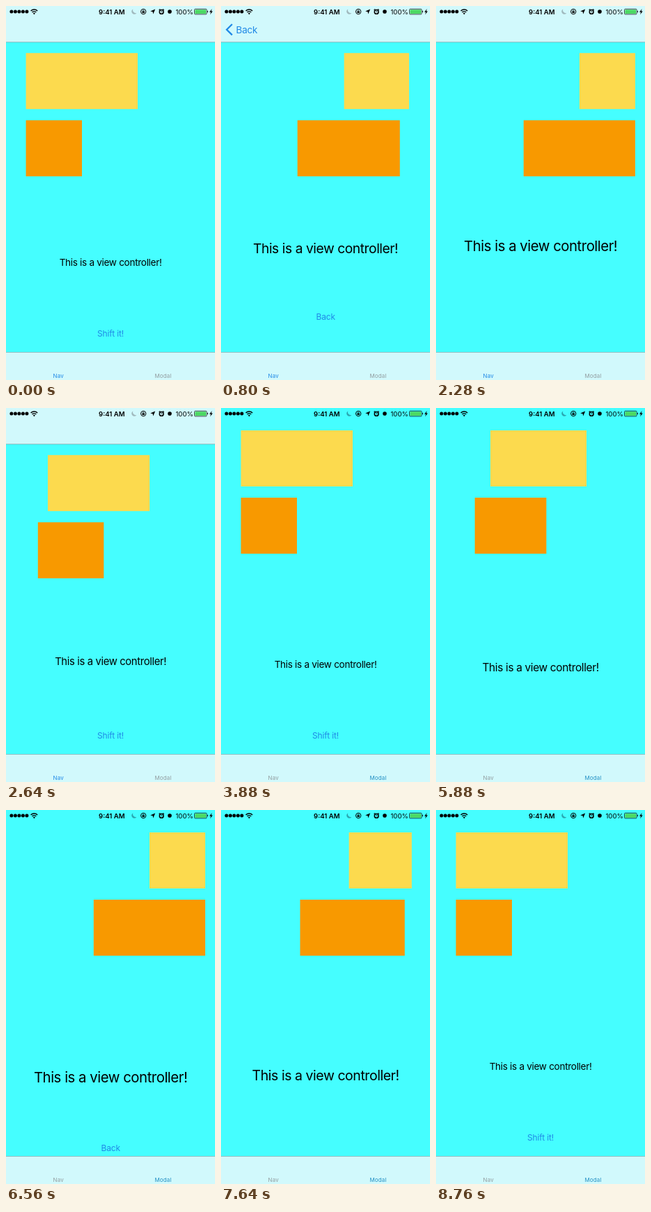
Write an HTML page that moves like this. It is 300 px wide and 534 px high and loops after 8800 ms.

```html
<!DOCTYPE html>
<html lang="en">
<head>
<meta charset="utf-8">
<title>View transition</title>
<style>
  html, body { margin: 0; width: 100%; height: 100%; overflow: hidden; background: #45feff; }
  svg { display: block; width: 100%; height: 100%; }
  text { font-family: Inter, Roboto, "Liberation Sans", sans-serif; }
  .mid { text-anchor: middle; }
  .title { font-size: 13.6px; letter-spacing: -.024em; }
  .button { font-size: 12px; letter-spacing: -.01em; fill: #2089e6; }
  .tab { font-size: 8px; letter-spacing: .015em; }
  .status { font-size: 9.6px; }
  .line { fill: none; stroke: #000; }
  .bar { fill: #d1f9fc; }
  .edge { fill: #94bec2; }
</style>
</head>
<body>
<svg viewBox="0 0 300 534">
  <rect width="300" height="534" fill="#45feff"/>
  <rect id="yellow" height="80" fill="#fcda4e"/>
  <rect id="orange" height="80" fill="#f89900"/>
  <g id="label"><text class="title mid" y="5.1">This is a view controller!</text></g>
  <text id="shift" class="button mid" x="150" y="471.6">Shift it!</text>
  <text id="back" class="button mid" x="150.2">Back</text>

  <g id="navBar">
    <rect class="bar" width="300" height="51"/>
    <rect class="edge" y="51" width="300" height="1"/>
    <g id="navBack">
      <path d="M16 26 8.2 33.7 16 41.4" fill="none" stroke="#2089e6" stroke-width="2.3"/>
      <text class="title" x="21.6" y="38.7" fill="#2089e6">Back</text>
    </g>
  </g>

  <rect class="bar" y="494" width="300" height="40"/>
  <rect class="edge" y="494" width="300" height="1"/>
  <text id="navTab" class="tab mid" x="75.2" y="531.2">Nav</text>
  <text id="modalTab" class="tab mid" x="225.5" y="531.2">Modal</text>

  <g id="dots"></g>
  <g class="line" stroke-width="1.4">
    <path d="M35.6 7a6.8 6.8 0 0 1 9.6 0M37.5 9.1a4.1 4.1 0 0 1 5.8 0"/>
    <path d="M40.4 12.2 38.9 10.6a2.1 2.1 0 0 1 3 0Z" fill="#000" stroke="none"/>
  </g>
  <text class="status mid" x="151.8" y="11.6" font-weight="600">9:41 AM</text>
  <path id="moon" d="M182.2 4.4a4 4 0 1 0 5.4 5.6 4.4 4.4 0 0 1-5.4-5.6Z"/>
  <circle class="line" cx="197.2" cy="8" r="3.7"/>
  <rect x="195.5" y="7.4" width="3.4" height="2.6"/>
  <path class="line" d="M196.2 7.5v-.6a1 1 0 0 1 2 0v.6" stroke-width=".7"/>
  <path d="M214.2 4.5 211.3 11.6 210.6 8.2 207.2 7.5Z"/>
  <circle class="line" cx="223.2" cy="8.4" r="2.9" stroke-width="1.5"/>
  <path class="line" d="M219.6 5.8 221.3 4.3M226.8 5.8 225.1 4.3" stroke-width="1.1"/>
  <path class="line" d="M223.2 6.6v2h1.4" stroke-width=".7"/>
  <circle cx="235" cy="8" r="2.8"/>
  <text class="status mid" x="256.2" y="11.6">100%</text>
  <rect class="line" x="270.5" y="4.3" width="17.6" height="7.6" rx="1.2" stroke-width=".7"/>
  <rect x="271.4" y="5.2" width="15.8" height="5.8" rx=".5" fill="#4cd964"/>
  <path d="M288.9 6.6a1.6 1.6 0 0 1 0 3Z"/>
  <path d="M295.6 4 292 8.7h2.1L293 12.2 296.8 7.4h-2.2Z"/>
</svg>
<script>
const LOOP = 8800, SHIFT = 500, TAB_SWITCH = 3800;
const $ = id => document.getElementById(id);

const scenes = {
  nav:   { push: 430,  pop: 2275, top: 67.2, labelEnd: 342, backY: 448 },
  modal: { push: 5707, pop: 7530, top: 32, labelEnd: 381, backY: 486.8 }
};

$("dots").innerHTML = [0, 1, 2, 3, 4]
  .map(i => `<circle cx="${7.9 + i * 5.5}" cy="8" r="2.5"/>`).join("");

const mix = (a, b, p) => a + (b - a) * p;
const ramp = (t, from, to) => Math.min(1, Math.max(0, (t - from) / (to - from)));
const ease = p => p * p * (3 - 2 * p);
const set = (id, attrs) => {
  for (const k in attrs) $(id).setAttribute(k, attrs[k]);
};

function box(id, y, left, right, p) {
  const x = mix(left[0], left[1], p);
  set(id, { x, y, width: mix(right[0], right[1], p) - x });
}

// Leaving controls fade before the shapes move; arriving ones fade in near the end.
const leave = (t, start) => 1 - ramp(t, start - 160, start - 10);
const arrive = (t, start) => ramp(t, start + 200, start + 360);

function draw(t) {
  const isNav = t < TAB_SWITCH;
  const { push, pop, top, labelEnd, backY } = isNav ? scenes.nav : scenes.modal;
  const p = ease(ramp(t, push, push + SHIFT)) - ease(ramp(t, pop, pop + SHIFT));

  box("yellow", top, [28.6, 206], [189, 286], p);
  box("orange", top + 96, [28.6, 125.8], [109, 286], p);
  set("label", {
    transform: `translate(150.1 ${mix(366, labelEnd, p)}) scale(${mix(1, 1.5, p)})`
  });
  set("shift", { opacity: Math.max(leave(t, push), arrive(t, pop)) });
  set("back", { y: backY, opacity: Math.min(arrive(t, push), leave(t, pop)) });

  set("navBar", { visibility: isNav ? "visible" : "hidden" });
  set("navBack", {
    opacity: Math.min(ramp(t, push - 100, push + 250), 1 - ramp(t, pop - 170, pop + 5))
  });
  set("navTab", { fill: isNav ? "#2089e6" : "#929da0" });
  set("modalTab", { fill: isNav ? "#929da0" : "#2390c4" });
  set("moon", { fill: isNav ? "#a0b9bd" : "#2ba6b0" });
}

const begin = performance.now();
function tick() {
  draw((performance.now() - begin) % LOOP);
  requestAnimationFrame(tick);
}
tick();
</script>
</body>
</html>
```
